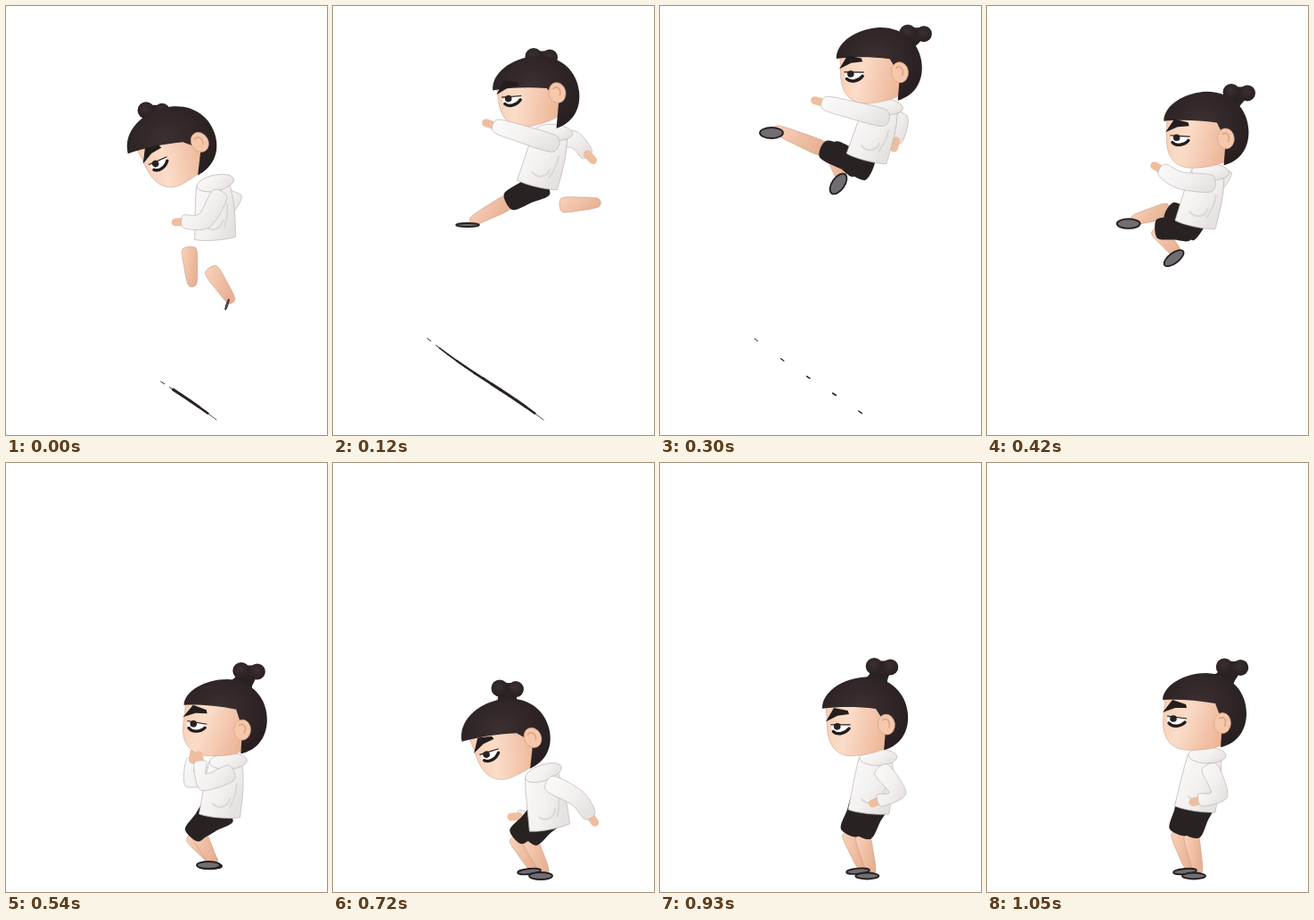
These frames come from a looping animation (360 by 480 pixels, 1080 ms). An HTML page:

```html
<!DOCTYPE html>
<html lang="en">
<head>
<meta charset="utf-8">
<title>Flying kick</title>
<style>
  html, body { margin: 0; width: 100%; height: 100%; overflow: hidden; background: #fff; }
  svg { display: block; width: 100vw; height: 100vh; }
  .cloth { fill: url(#cloth); stroke: #bbb6b4; stroke-width: .7; }
  .skin { fill: url(#skin); stroke: #c08d74; stroke-width: .5; }
  .hand { stroke: #efbd9f; stroke-width: 9; stroke-linecap: round; }
  .dark { fill: #292223; }
  .shoe { fill: #716d73; stroke: #241f21; }
  .fold { fill: none; stroke: #dbd7d5; stroke-width: 2; stroke-linecap: round; }
</style>
</head>
<body>
<svg viewBox="0 0 360 480">
  <defs>
    <linearGradient id="cloth" x2="1" y2=".6">
      <stop offset="0" stop-color="#fbfafa"/><stop offset=".6" stop-color="#f3f1f0"/><stop offset="1" stop-color="#e6e2e1"/>
    </linearGradient>
    <linearGradient id="skin" x2="1" y2=".4">
      <stop offset="0" stop-color="#f9d3bb"/><stop offset="1" stop-color="#e8b194"/>
    </linearGradient>
    <linearGradient id="face" x2="1" y2=".3">
      <stop offset="0" stop-color="#f6cdb3"/><stop offset=".4" stop-color="#fbdcc8"/><stop offset="1" stop-color="#edb698"/>
    </linearGradient>
    <radialGradient id="hair" cx=".45" cy=".4" r=".65">
      <stop offset="0" stop-color="#3c3031"/><stop offset="1" stop-color="#271e1f"/>
    </radialGradient>
  </defs>
  <g id="trail" stroke="#2a2223" stroke-linecap="round"></g>
  <path id="farSleeve" class="cloth"/>
  <path id="farHand" class="hand"/>
  <path id="farShin" class="skin"/>
  <path id="nearShin" class="skin"/>
  <path id="farShorts" class="dark"/>
  <path id="nearShorts" class="dark"/>
  <ellipse id="farShoe" class="shoe"/>
  <ellipse id="nearShoe" class="shoe"/>
  <g id="torso">
    <path class="cloth" d="M-17 6C-10-4 12-6 20 4C25 24 24 45 23 65C10 68-12 68-23 65C-21 45-20 25-17 6Z"/>
    <path class="fold" d="M-9 52C-2 58 8 55 10 45M16 28C17 38 14 46 11 54"/>
    <ellipse class="cloth" cx="4" cy="4" rx="21" ry="9" transform="rotate(-8)"/>
  </g>
  <path id="bunNeck" class="dark"/>
  <g id="bun">
    <path stroke="#2e2425" stroke-width="14" d="M-8 1H8"/>
    <circle cx="-9" r="9.5" fill="url(#hair)"/>
    <circle cx="9" cy="1" r="9" fill="url(#hair)"/>
  </g>
  <path id="face" fill="url(#face)" stroke="#c79a82" stroke-width=".5" d="M-45-18C-44 0-48 8-46 20C-44 34-34 42-22 43C-5 44 10 42 18 38L27 8L12-18Z"/>
  <path id="hairCap" fill="url(#hair)"/>
  <g id="features">
    <ellipse cx="20" cy="13" rx="9.5" ry="11.5" fill="#f5c7ab" stroke="#d99d80" stroke-width=".6"/>
    <path fill="none" stroke="#dda184" stroke-width="1.5" d="M16 8C21 4 26 10 22 17"/>
    <path fill="#fff" d="M-42 7L-20 9C-24 16-34 19-41 12Z"/>
    <path fill="none" stroke="#241d1e" stroke-width="1.2" d="M-42 5L-20 8"/>
    <circle class="dark" cx="-35" cy="8" r="3.8"/>
    <path fill="none" stroke="#241d1e" stroke-width="3.4" stroke-linecap="round" d="M-40 13C-36 18-27 17-22 12"/>
    <path fill="#241d1e" d="M-47 1L-36-13L-21-8L-20-4L-33-4Z"/>
  </g>
  <path id="nearHand" class="hand"/>
  <path id="nearSleeve" class="cloth"/>
</svg>
<script>
const LOOP = 1080, STEP = 30, ARM = 36, LEG = 43;
const el = Object.fromEntries([...document.querySelectorAll('[id]')].map(e => [e.id, e]));
const set = (e, attrs) => { for (const k in attrs) e.setAttribute(k, attrs[k]); };

const easeOut = u => u * (2 - u);
const easeInOut = u => u * u * (3 - 2 * u);
const fall = u => u ** 1.6;

// head: x y turn lift; bun: angle distance; soles: near and far thickness, far tilt
const poses = [
  { at: 0, ease: easeOut, head: [186, 156, -31, 0], bun: [-27, 44], neck: [230, 195], hip: [234, 252],
    nearHand: [188, 242], farHand: [236, 242], nearFoot: [209, 312], farFoot: [253, 330], soles: [0, 1, -72] },
  { at: 120, ease: easeOut, head: [228, 99, -12, -10], bun: [8, 43], neck: [244, 137], hip: [230, 196],
    nearHand: [169, 130], farHand: [293, 174], nearFoot: [156, 241], farFoot: [298, 220], soles: [2, 0, 0] },
  { at: 300, ease: fall, head: [246, 67, -7, -3], bun: [48, 55], neck: [248, 108], hip: [229, 180],
    nearHand: [171, 105], farHand: [262, 161], nearFoot: [130, 138], farFoot: [205, 195], soles: [6, 7, -55] },
  { at: 540, ease: easeInOut, head: [246, 285, 2, 0], bun: [27, 59], neck: [245, 330], hip: [240, 388],
    nearHand: [216, 325], farHand: [211, 322], nearFoot: [232, 446], farFoot: [234, 447], soles: [4, 3, 0] },
  { at: 720, ease: easeInOut, head: [194, 307, -25, 0], bun: [2, 55], neck: [231, 344], hip: [240, 392],
    nearHand: [295, 404], farHand: [198, 396], nearFoot: [238, 458], farFoot: [225, 453], soles: [4, 3, -6] },
  { at: 840, ease: easeOut, head: [202, 292, -23, 0], bun: [-8, 57], neck: [236, 331], hip: [236, 381],
    nearHand: [252, 385], farHand: [209, 389], nearFoot: [238, 458], farFoot: [227, 452], soles: [3.5, 3, -5] },
  { at: 1050, ease: easeOut, head: [244, 278, 0, 0], bun: [32, 59], neck: [243, 323], hip: [235, 375],
    nearHand: [229, 380], farHand: [222, 376], nearFoot: [237, 458], farFoot: [227, 453], soles: [3.5, 3, -5] }
];

const mix = (a, b, u) => a.map((v, i) => v + (b[i] - v) * u);
const shift = ([x, y], dx, dy) => [x + dx, y + dy];
function spin([x, y], degrees) {
  const a = degrees * Math.PI / 180, c = Math.cos(a), s = Math.sin(a);
  return [x * c - y * s, x * s + y * c];
}

// Closed Catmull-Rom curve
function blob(points) {
  const n = points.length, p = i => points[(i + n) % n];
  let d = `M${p(0)}`;
  for (let i = 0; i < n; i++) {
    const bend = (k, s) => p(i + k).map((v, j) => v + s * (p(i + k + 1)[j] - p(i + k - 1)[j]) / 7);
    d += `C${bend(0, 1)} ${bend(1, -1)} ${p(i + 1)}`;
  }
  return d + 'Z';
}

// Tapered outline around a chain of joints
function limb(points, widths) {
  const left = [], right = [];
  points.forEach(([x, y], i) => {
    const a = points[Math.max(i - 1, 0)], b = points[Math.min(i + 1, points.length - 1)];
    const dx = b[0] - a[0], dy = b[1] - a[1], k = widths[i] / (Math.hypot(dx, dy) || 1);
    left.push([x - dy * k, y + dx * k]);
    right.unshift([x + dy * k, y - dx * k]);
  });
  return blob([...left, ...right]);
}

// Middle joint of a two-bone chain, slightly foreshortened
function joint(a, b, bone, side) {
  const dx = b[0] - a[0], dy = b[1] - a[1], d = Math.hypot(dx, dy) || 1;
  const k = side * .85 * Math.sqrt(Math.max(0, bone ** 2 - d * d / 4)) / d;
  return shift(mix(a, b, .5), dy * k, -dx * k);
}

function drawArm(name, shoulder, hand) {
  const elbow = joint(shoulder, hand, ARM, 1), wrist = mix(elbow, hand, .68);
  set(el[name + 'Sleeve'], { d: limb([shoulder, elbow, wrist], [9, 9.5, 7]) });
  set(el[name + 'Hand'], { d: `M${wrist}L${mix(wrist, hand, .8)}` });
}

function drawLeg(name, hip, foot, thickness, tilt, dressed) {
  const knee = joint(hip, foot, LEG, -1);
  set(el[name + 'Shin'], { d: limb([knee, mix(knee, foot, .5), foot], [7.5, 7.5, 4.5]) });
  set(el[name + 'Shorts'], {
    d: limb([hip, mix(hip, knee, .5), knee], [14, 13, 10]),
    visibility: dressed ? 'visible' : 'hidden'
  });
  const [cx, cy] = shift(foot, -5, 4), size = Math.min(1, thickness / 2);
  set(el[name + 'Shoe'], {
    cx, cy, rx: 13 * size, ry: thickness, 'stroke-width': 1.8 * size,
    transform: `rotate(${tilt} ${cx} ${cy})`
  });
}

function drawHead([x, y, turn, lift], [angle, distance]) {
  const nod = -turn * .28, stretch = 1 - turn * .002;
  const place = `translate(${x} ${y})`;
  const face = { transform: `${place} rotate(${turn}) translate(${nod} ${lift})` };
  set(el.face, face);
  set(el.features, face);
  // The cap tilts less than the face, and the fringe drops as the head nods
  set(el.hairCap, {
    transform: `${place} rotate(${turn / 2}) scale(${stretch} 1)`,
    d: `M-47 ${nod - 13}C-46-30-22-43 2-43C30-42 47-22 47 2C47 22 36 36 18 40` +
       `L${20 + nod} 12L12 ${nod - 9}C-10 ${nod - 13}-30 ${nod - 14}-47 ${nod - 13}Z`
  });
  const bun = shift(spin([0, -distance], angle), x, y);
  set(el.bun, { transform: `translate(${bun})` });
  set(el.bunNeck, { d: limb([bun, mix(bun, [x, y], .25), mix(bun, [x, y], .5)], [9, 11, 18]) });
}

const BITS = 14;
const bits = Array.from({ length: BITS }, () =>
  el.trail.appendChild(document.createElementNS('http://www.w3.org/2000/svg', 'path')));
const along = s => [236 - 136 * s, 463 - 96 * s + 8 * Math.sin(Math.PI * s) * (s - .3)];

// A streak that races up the slope, then breaks into specks
function drawTrail(t) {
  const front = .32 + .68 * Math.min(t / 120, 1);
  const whole = Math.min(1, Math.max(0, 1 - (t - 120) / 170));
  bits.forEach((bit, i) => {
    const s = i / BITS, speck = i % 3 === 1 && t < 360;
    const loose = s > Math.min(front, .85);
    const length = Math.max(whole * (loose ? .4 : 1), speck ? .35 : 0);
    set(bit, {
      visibility: length && s < front + .12 ? 'visible' : 'hidden',
      d: `M${along(s)}L${along(s + length / BITS)}`,
      'stroke-width': loose ? 1 : .8 + 2.4 * Math.sin(Math.PI * Math.sqrt(s)) * (.4 + .6 * whole)
    });
  });
}

function poseAt(t) {
  const i = Math.max(0, poses.findIndex(p => p.at > t) - 1 + (t >= LOOP - STEP) * poses.length);
  const from = Math.min(i, poses.length - 2), a = poses[from], b = poses[from + 1];
  const raw = (t - a.at) / (b.at - a.at), pose = {};
  for (const key in a) if (Array.isArray(a[key])) pose[key] = mix(a[key], b[key], a.ease(raw));
  // While landing, the arm swings wide past the body
  if (a.at === 540) pose.nearHand[0] += 58 * Math.sin(Math.PI * raw);
  return pose;
}

function draw(t) {
  const p = poseAt(t);
  const lean = Math.atan2(p.neck[0] - p.hip[0], p.hip[1] - p.neck[1]) * 180 / Math.PI;
  const onBody = (origin, x, y) => shift(spin([x, y], lean), ...origin);
  const [nearSole, farSole, farTilt] = p.soles;
  drawTrail(t);
  drawArm('far', onBody(p.neck, -6, 17), p.farHand);
  drawArm('near', onBody(p.neck, 9, 16), p.nearHand);
  drawLeg('far', onBody(p.hip, -5, 0), p.farFoot, farSole, farTilt, t >= 180);
  drawLeg('near', onBody(p.hip, 7, 0), p.nearFoot, nearSole, 0, t >= 60);
  set(el.torso, { transform: `translate(${p.neck}) rotate(${lean})` });
  drawHead(p.head, p.bun);
}

const start = performance.now();
function tick() {
  const t = (performance.now() - start) % LOOP;
  draw(Math.floor(t / STEP) * STEP);
  requestAnimationFrame(tick);
}
tick();
</script>
</body>
</html>
```
